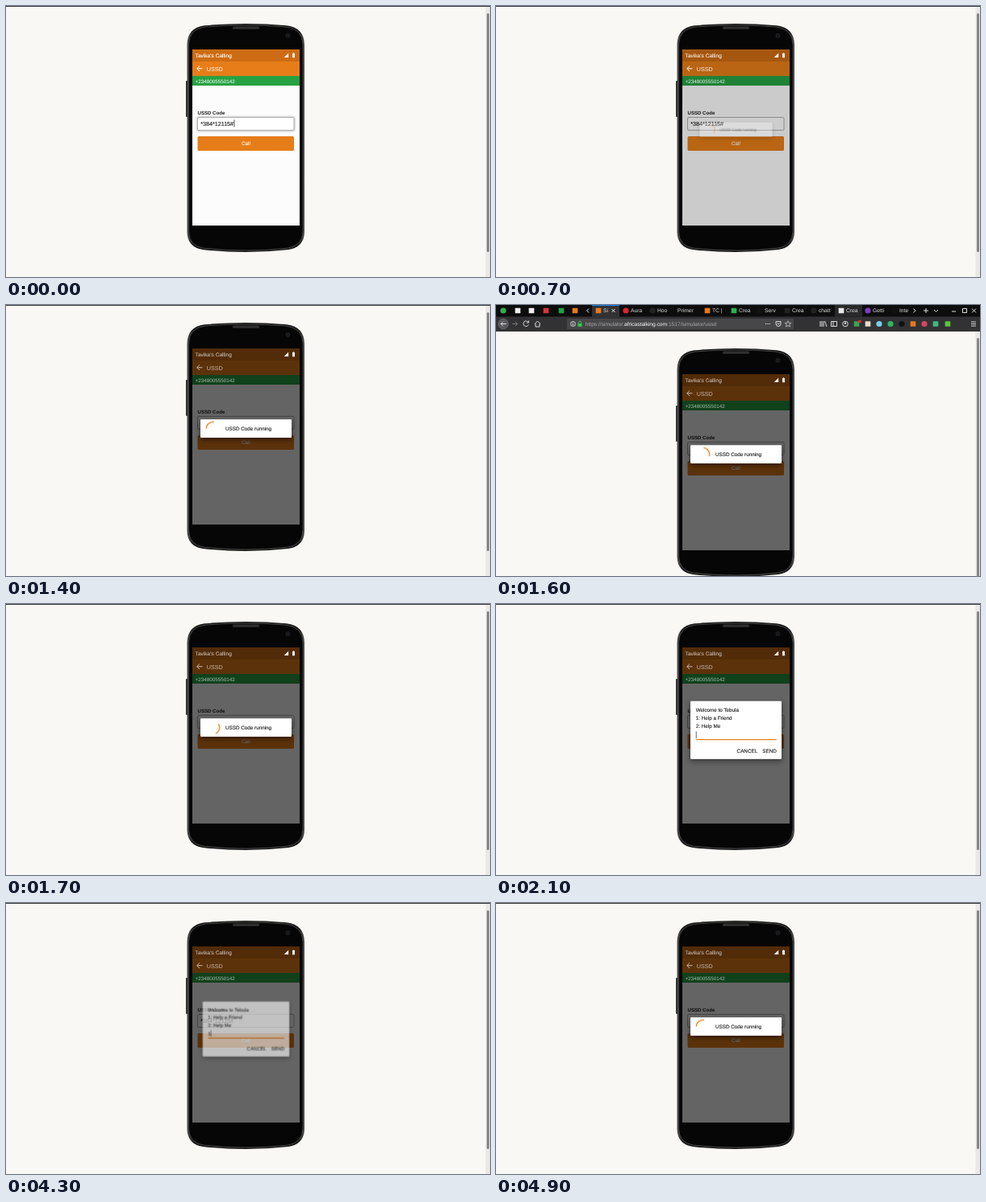
Recreate the animation shown at these times as an HTML page. Size 600 px wide and 337 px high, loop 5 s.

```html
<!DOCTYPE html>
<html lang="en">
<head>
<meta charset="utf-8">
<title>USSD simulator</title>
<style>
  html, body { margin: 0; width: 100%; height: 100%; overflow: hidden; background: #f9f8f4; }
  svg { display: block; width: 100vw; height: 100vh; }
  text { font: 6.3px "Liberation Sans", Arial, sans-serif; text-rendering: geometricPrecision; white-space: pre; }
  .ink text { fill: #1c1c1c; stroke: #1c1c1c; stroke-width: .12; }
  .line { fill: none; stroke: #ddd; stroke-width: 1; }

  .page, .chrome, .dim, .labels, .glow, .caret, .reply, .reply-caret, .running, .menu, .spin {
    animation: 5s step-end infinite;
  }
  .running, .menu { transform-origin: 297.5px 154px; }
  .spin { transform-origin: 256.5px 153.7px; animation-name: spin; }
  .page { animation-name: page; }
  .chrome { animation-name: chrome; }
  .dim { animation-name: dim; }
  .labels { animation-name: labels; }
  .glow { animation-name: glow; }
  .caret { animation-name: caret; }
  .reply { animation-name: reply; }
  .reply-caret { animation-name: reply-caret; }
  .running { animation-name: running; }
  .menu { animation-name: menu; }

  @keyframes page {
    0%, 34%, 100% { transform: none; }
    32% { transform: translateY(32px); }
  }
  @keyframes chrome {
    0%, 34%, 100% { opacity: 0; }
    32% { opacity: 1; }
  }
  @keyframes dim {
    0% { opacity: 0; }
    12% { opacity: .06; }
    14% { opacity: .33; }
    16% { opacity: .66; }
    18%, 100% { opacity: 1; }
  }
  @keyframes labels {
    0% { opacity: 1; }
    14% { opacity: .9; }
    16% { opacity: .75; }
    18%, 100% { opacity: .65; }
  }
  @keyframes glow {
    0% { opacity: 1; }
    12%, 100% { opacity: 0; }
  }
  @keyframes caret {
    0% { opacity: 1; }
    8%, 100% { opacity: 0; }
  }
  @keyframes reply {
    0%, 100% { opacity: 0; }
    76% { opacity: 1; }
  }
  @keyframes reply-caret {
    0%, 64% { opacity: 0; transform: none; }
    42% { opacity: 1; transform: none; }
    76%, 100% { opacity: 1; transform: translateX(3.6px); }
  }
  @keyframes running {
    0%, 38% { opacity: 0; transform: scale(.8); }
    14%, 88% { opacity: .3; transform: scale(.8); }
    16%, 90% { opacity: .65; transform: scale(.9); }
    18% { opacity: 1; transform: none; }
    36% { opacity: .6; transform: scale(.95); }
    92%, 100% { opacity: 1; transform: none; }
  }
  @keyframes menu {
    0%, 88%, 100% { opacity: 0; transform: scale(.8); }
    38% { opacity: .3; transform: scale(.8); }
    40% { opacity: .65; transform: scale(.9); }
    42% { opacity: 1; transform: none; }
    86% { opacity: .6; transform: scale(.95); }
  }
  @keyframes spin {
    0% { transform: rotate(-60deg); }
    16% { transform: rotate(-36deg); animation-timing-function: steps(3); }
    22% { transform: rotate(36deg); animation-timing-function: steps(7); }
    36% { transform: rotate(372deg); }
    88% { transform: rotate(-60deg); animation-timing-function: steps(6); }
    100% { transform: rotate(228deg); }
  }
</style>
</head>
<body>
<svg viewBox="0 0 600 337" preserveAspectRatio="none">
  <defs>
    <linearGradient id="rim" x1="0" x2="1" y1="0" y2="0">
      <stop offset="0" stop-color="#4c4c4c"/>
      <stop offset=".05" stop-color="#171717"/>
      <stop offset=".95" stop-color="#171717"/>
      <stop offset="1" stop-color="#4c4c4c"/>
    </linearGradient>
    <filter id="shadow" x="-20%" y="-40%" width="140%" height="200%">
      <feDropShadow dx="0" dy="2.5" stdDeviation="3" flood-opacity=".5"/>
    </filter>
    <filter id="soft" x="-10%" y="-40%" width="120%" height="180%"><feGaussianBlur stdDeviation="1"/></filter>
  </defs>

  <rect width="600" height="337" fill="#f9f8f4"/>

  <g class="page">
    <rect width="600" height="1" fill="#3a3a3a"/>
    <rect x="594.5" y="1" width="5.5" height="340" fill="#e9e8e5"/>
    <rect x="596" y="9" width="3" height="297" rx="1.5" fill="#858585"/>

    <!-- phone body -->
    <rect x="223" y="93" width="3" height="45" rx="1" fill="#2b2b2b"/>
    <path d="M224.5 48Q225 27 246 24.2Q297 19.6 348 24.2Q369.500 27 370 48V281Q369.500 300 350 303Q297 309 244 303Q225 300 224.500 281Z" fill="url(#rim)"/>
    <path d="M226.300 48Q227 28.500 247 26Q297 21.500 347 26Q367.500 28.500 368.200 48V280Q367.500 298.500 349 301.200Q297 307 245 301.200Q227 298.500 226.300 280Z" fill="#060606" stroke="#555" stroke-width=".8"/>
    <rect x="281" y="25.600" width="33" height="3.200" rx="1.600" fill="#303030"/>
    <circle cx="349.500" cy="37" r="2.600" fill="#15181c" stroke="#25282c" stroke-width=".6"/>

    <!-- app screen -->
    <g>
      <rect x="231" y="54" width="133" height="219" fill="#fcfcfc"/>
      <rect x="231" y="54" width="133" height="15" fill="#cd6c14"/>
      <rect x="231" y="69" width="133" height="18" fill="#e67d18"/>
      <rect x="231" y="87" width="133" height="12" fill="#27a243"/>
      <g class="ink">
        <text x="237.500" y="134.500" style="font-size:6.1px;font-weight:bold;stroke:none">USSD Code</text>
      </g>
      <rect class="glow" x="237.500" y="138.500" width="119.500" height="16.500" rx="1.500" fill="none" stroke="#aaa" stroke-width="1.600" filter="url(#soft)"/>
      <rect x="237.500" y="138.500" width="119.500" height="16" rx="1.500" fill="#fff" stroke="#a4a4a4" stroke-width=".9"/>
      <g class="ink"><text x="241.300" y="149.200" style="font-size:7.15px">*384*12115#</text></g>
      <rect class="caret" x="282.600" y="141.500" width=".8" height="9" fill="#222"/>
      <rect x="237.500" y="162" width="119.500" height="18" rx="1.500" fill="#e67d18"/>
      <text x="297.500" y="173.200" text-anchor="middle" fill="#fff" stroke="#fff" stroke-width=".1">Call</text>
    </g>
    <rect class="dim" x="231" y="54" width="133" height="219" fill="#000" fill-opacity=".6"/>

    <g class="labels" fill="#fff">
      <text x="234.600" y="63.800" style="font-size:6.6px" stroke="#fff" stroke-width=".12">Tavika's Calling</text>
      <text x="248.800" y="80.600" style="font-size:7.2px">USSD</text>
      <text x="234.600" y="95.600">+2348005550142</text>
      <path d="M243.500 77.800H236.800M240 74.500L236.700 77.800L240 81.100" fill="none" stroke="#fff" stroke-width="1"/>
    </g>
    <path d="M350.200 58.500V64H344.700Z" fill="#f4f0ec"/>
    <path d="M355 59H355.800V58.200H357.200V59H358V64.200H355Z" fill="#f4f0ec"/>

    <!-- loading dialog -->
    <g class="running ink">
      <rect x="241" y="142.300" width="113" height="22.700" rx="1" fill="#fff" filter="url(#shadow)"/>
      <path class="spin" d="M264.700 153.700A8.200 8.200 0 0 1 254.930 161.750" fill="none" stroke="#e67d18" stroke-width="1.200"/>
      <text x="272" y="156.200">USSD Code running</text>
    </g>

    <!-- menu dialog -->
    <g class="menu ink">
      <rect x="241" y="120.800" width="113" height="72" rx="1" fill="#fff" filter="url(#shadow)"/>
      <text x="247.700" y="133.800">Welcome to Tebula</text>
      <text x="247.700" y="143.700">1: Help a Friend</text>
      <text x="247.700" y="153.600">2: Help Me</text>
      <text class="reply" x="248" y="165.500">1</text>
      <rect class="reply-caret" x="247.800" y="158.500" width=".7" height="8.500" fill="#222"/>
      <rect x="248" y="168" width="99.500" height="1.200" fill="#e67d18"/>
      <text x="298.600" y="185.300">CANCEL</text>
      <text x="330.300" y="185.300">SEND</text>
    </g>
  </g>

  <!-- browser bars -->
  <g class="chrome">
    <rect width="600" height="15" fill="#0d0d0e"/>
    <rect y="14.500" width="600" height="18" fill="#323234"/>
    <rect x="119" width="34" height="15" fill="#323234"/>
    <rect x="119" width="34" height="1" fill="#0a84ff"/>
    <rect x="420" width="34" height="14.500" fill="#29292b"/>
    <g id="tabs" fill="#ddd"></g>
    <path class="line" d="M115 4.500L112.500 7L115 9.500M517.500 4.500L520 7L517.500 9.500M530 7H536M533 4V10M543 6L545.500 8.500L548 6M565 8H570M578.500 4.500H583.500V9.500H578.500ZM590 4.500L595 9.500M595 4.500L590 9.500M143.500 5L147.500 9M147.500 5L143.500 9"/>

    <circle cx="9" cy="23.500" r="6.300" fill="#58585b" stroke="#77777a" stroke-width=".6"/>
    <path class="line" d="M12.500 23.500H6M8.800 20.700L6 23.500L8.800 26.300M40 21.500A3.300 3.300 0 1 0 40.300 24.500M40.500 19.500V22H38M48 23.500L51.500 20L55 23.500M49 23V27H54V23"/>
    <path class="line" d="M20 23.500H26.500M23.700 20.700L26.500 23.500L23.700 26.300" opacity=".4"/>
    <rect x="88" y="17" width="281" height="13" rx="1.500" fill="#474749"/>
    <circle class="line" cx="95.500" cy="23.500" r="2.900" stroke-width=".8"/>
    <path class="line" d="M95.500 23V25.200M95.500 21.500V22.200" stroke-width=".8"/>
    <rect x="101.500" y="23" width="5" height="3.800" fill="#2ecb4b"/>
    <path d="M102.500 23V21.500A1.500 1.500 0 0 1 105.500 21.500V23" fill="none" stroke="#2ecb4b" stroke-width=".9"/>
    <text x="110.800" y="25.800" fill="#aaa" style="font-size:6.63px">https://simulator.<tspan fill="#fff">africastalking.com</tspan>:1517/simulator/ussd</text>
    <path class="line" d="M334 23.500H340" stroke-width="1.300" stroke-dasharray="1.300 1.050"/>
    <path class="line" d="M347 20.500H353V23A3 3.500 0 0 1 347 23ZM348.500 22.500L350 24L351.500 22.500" stroke-width=".9"/>
    <path d="M362 19.800L363.100 22.300L365.800 22.500L363.700 24.300L364.400 27L362 25.500L359.600 27L360.300 24.300L358.200 22.500L360.900 22.300Z" fill="none" stroke="#ddd" stroke-width=".7"/>
    <path class="line" d="M402 20V27M404 20V27M406 20V27M407.500 20L410 27M415.500 20.500H422.500V26.500H415.500ZM418 20.500V26.500M589 21H595M589 23.500H595M589 26H595"/>
    <circle cx="433" cy="23.500" r="3.300" class="line"/>
    <circle cx="433" cy="22.800" r="1.200" fill="#ddd"/>
    <g id="tools"></g>
  </g>
</svg>
<script>
  const NS = "http://www.w3.org/2000/svg";
  const tabs = document.getElementById("tabs");
  const tools = document.getElementById("tools");

  function add(parent, tag, attrs, label = "") {
    const el = document.createElementNS(NS, tag);
    for (const key in attrs) el.setAttribute(key, attrs[key]);
    el.textContent = label;
    parent.append(el);
  }
  const dot = (parent, x, y, fill, r = 3.6) => add(parent, "circle", { cx: x, cy: y, r, fill });
  const box = (parent, x, y, fill, s = 6.6) =>
    add(parent, "rect", { x: x - s / 2, y: y - s / 2, width: s, height: s, rx: .6, fill });

  // icon shape, icon x, colour, title
  [
    [dot, 9, "#2fae4e"], [box, 27, "#eee"], [box, 44, "#eee"], [box, 62, "#d8343a"],
    [box, 81, "#1fa33c"], [box, 98, "#e8791c"], [box, 127, "#e8791c", "Si"],
    [dot, 161, "#d8262c", "Aura"], [dot, 194, "#222", "Hoo"], [null, 219, "", "Primer"],
    [box, 262, "#e8791c", "TC |"], [box, 295, "#29b34a", "Crea"], [box, 327, "#111", "Serv"],
    [box, 361, "#222", "Crea"], [dot, 394, "#222", "chatt"], [box, 428, "#e8e8e8", "Crea"],
    [dot, 461, "#7a3fc0", "Getti"], [box, 494, "#111", "Inte"]
  ].forEach(([shape, x, fill, title]) => {
    if (shape) shape(tabs, x, 7, fill);
    if (title) add(tabs, "text", { x: x + 6, y: 9.4, style: "font-size:6.7px" }, title);
  });

  [
    [box, 447, "#35a853"], [box, 461, "#e9dccb"], [dot, 475, "#74cfe5"], [dot, 489, "#2fb765"],
    [dot, 503, "#111"], [box, 517, "#e8791c"], [dot, 531, "#d9465c"], [box, 545, "#41b883"],
    [box, 560, "#5cc53a"]
  ].forEach(([shape, x, fill]) => shape(tools, x, 23.5, fill));
  dot(tools, 451, 20.5, "#e02b2b", 2);
</script>
</body>
</html>
```
